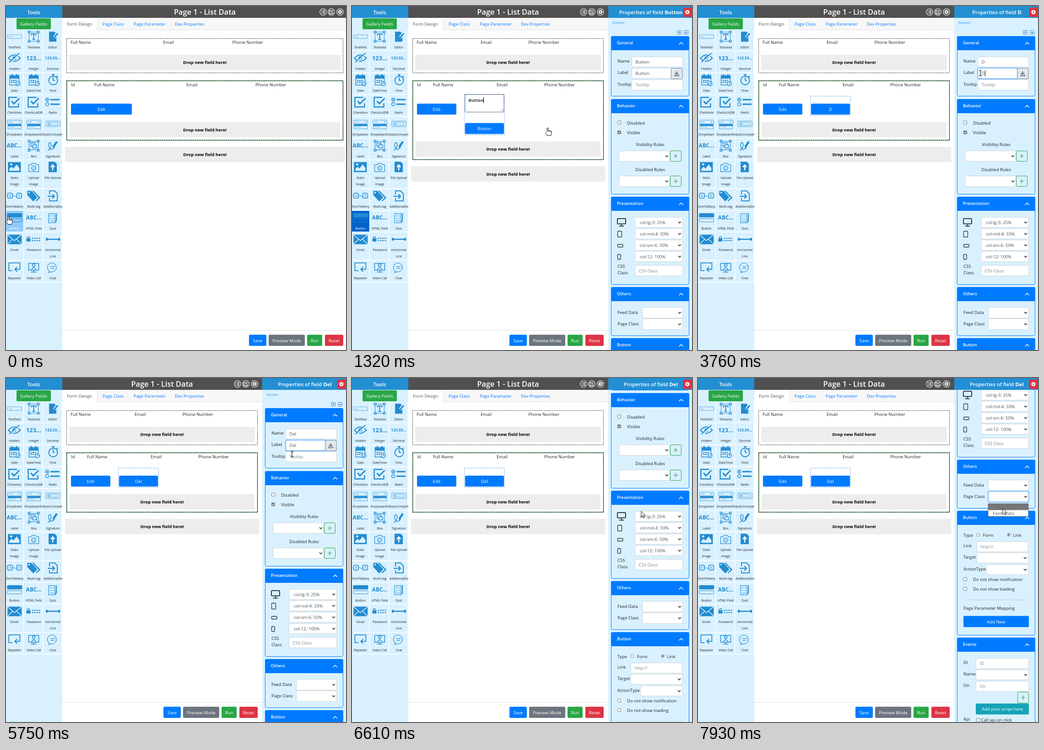
Recreate the animation shown at these times as an HTML page. Size 743 px wide and 754 px high, loop 8000 ms.

```html
<!DOCTYPE html>
<html lang="en">
<head>
<meta charset="utf-8">
<title>Form designer</title>
<style>
html, body { margin: 0; width: 100%; height: 100%; overflow: hidden; background: #fff; }
svg { display: block; }
text { font-family: "Open Sans", "Noto Sans", sans-serif; white-space: pre; }
.ico { fill: none; stroke: #238bd0; stroke-width: 1.5; }
.ico .f { fill: #238bd0; stroke: none; }
.ico .w { stroke: #fff; }
</style>
</head>
<body>
<svg id="stage" width="743" height="754" viewBox="0 0 743 754"></svg>
<script>
const LOOP = 8000, STEP = 65.5, ANCHOR = 6350;
const SKY = '#d9f1ff', HEAD = '#238fd3', BLUE = '#007bff', GREEN = '#28a745', INK = '#212529';

// markup helpers
const el = (tag, a, inner = '') =>
  `<${tag} ${Object.entries(a).map(([k, v]) => `${k}="${v}"`).join(' ')}>${inner}</${tag}>`;
const rect = (x, y, width, height, fill, o = {}) => el('rect', { x, y, width, height, fill, ...o });
const path = (d, o = {}) => el('path', { d, ...o });
const circle = (cx, cy, r, o = {}) => el('circle', { cx, cy, r, ...o });
const group = (x, y, inner, o = {}) => el('g', { transform: `translate(${x} ${y})`, ...o }, inner);
const text = (x, y, s, size = 9.5, fill = INK, o = {}) =>
  el('text', { x, y: y + size * .36, 'font-size': size, fill, ...o }, s);
const mid = { 'text-anchor': 'middle' }, semi = { 'font-weight': 600 }, bold = { 'font-weight': 700 };
const line = (d, stroke, w = 1, o = {}) => path(d, { fill: 'none', stroke, 'stroke-width': w, ...o });
const button = (x, y, w, h, fill, s) =>
  rect(x, y, w, h, fill, { rx: 2.5 }) + text(x + w / 2, y + h / 2 + .5, s, 9.5, '#fff', mid);

// tool icons, centred on 0,0
const f = { class: 'f' }, white = { class: 'w' };
const box = (x, y, w, h, o = {}) => el('rect', { x, y, width: w, height: h, ...o });
const glyphs = (s, size) => el('text', { y: size * .36, 'font-size': size, ...mid, ...bold, ...f }, s);
const corners = r => [-r, r].map(x => [-r, r].map(y => box(x - 2, y - 2, 4, 4, { fill: SKY })).join('')).join('');
const tick = path('M-6-2L-1 4L11-8', { 'stroke-width': 3 });
const checkbox = path('M6-10H-12V11H9V3', { 'stroke-width': 2.4 }) + tick;
const calendar = path('M-10-10H10V11H-10Z') + box(-10, -9, 20, 6, f) + path('M-5-13V-7M5-13V-7', { 'stroke-width': 2.5 }) +
  path('M-7 1H5M-7 5H3', { 'stroke-dasharray': '3 1.5', 'stroke-width': 2.5 });
const badge = d => circle(8, 8, 4.5, { fill: SKY }) + path(d, { 'stroke-width': 1.1 });
const dropdown = box(-15, -8, 31, 8, { rx: 1, 'stroke-width': .8 }) + path('M9-5H13L11-3Z', f) +
  path('M-12-4H-4', { 'stroke-width': .8 }) + box(-14, 1, 29, 4, f) + box(-14, 1, 29, 10, { 'stroke-width': .8 }) +
  path('M-11 7H2', { 'stroke-width': .8, 'stroke-dasharray': '3 1' });
const icons = [
  box(-15, -4, 31, 8, { rx: 1, 'stroke-width': .7 }) + el('text', { x: -12, y: 1.5, 'font-size': 4, ...f }, 'Text'),
  path('M-10-10H10V10H-10Z', { 'stroke-width': 1 }) + corners(10) + path('M-5-3V-6H5V-3M0-6V6M-3 6H3', { 'stroke-width': 2 }),
  path('M-8-11H4L8-6V11H-8Z', f) + path('M3 2L10-7', { class: 'w', 'stroke-width': 6 }) + path('M3 2L11-7', { 'stroke-width': 3.5 }),
  path('M-13 0Q0-14 13 0Q0 14-13 0Z', { 'stroke-width': 2 }) + circle(0, 0, 4, f) +
    path('M-10 10L12-10', { stroke: SKY, 'stroke-width': 4 }) + path('M-11 9L11-11', { 'stroke-width': 2 }),
  glyphs('123...', 12.8),
  glyphs('123,55...', 8.4),
  calendar + badge('M6 8L8 10L11 6'),
  calendar + badge('M8 5V8H11'),
  circle(1, 1, 9.5, { 'stroke-width': 2 }) + path('M1 1V-6M1 1H5M-2-12H4M1-12V-9M8-9L11-6', { 'stroke-width': 2 }),
  checkbox,
  checkbox,
  circle(-12, -5, 3.5) + circle(-12, -5, 1.5, f) + circle(-12, 5, 3.5) +
    path('M-5-5H15M-5 5H15', { 'stroke-width': 3 }),
  dropdown,
  dropdown,
  box(-15, -6, 31, 12, { rx: 1, 'stroke-width': .8 }) + path('M-11-3H11V3H-11Z', { 'stroke-width': .7 }) + path('M-9-2V2M-6-2V2', { 'stroke-width': 1 }),
  glyphs('ABC...', 11.7),
  path('M-10-9H10V9H-10Z', { 'stroke-width': 1.2 }) + corners(10) + box(-6, -6, 9, 8) + box(-2, -2, 8, 7, { fill: SKY }),
  path('M-11 10C-2 9-2-8-6-7C-12-5-8 8-3 8S0 4 2 6') + path('M1 3L9-9', { 'stroke-width': 4.5 }) + path('M-1 8L2 2L5 4Z', f),
  box(-14, -11, 28, 22, f) + path('M-11 8V4L-6-1L-2 3L5-6L11 2V8Z', { fill: SKY, stroke: 'none' }) + circle(-7, -6, 2.4, { fill: SKY, stroke: 'none' }),
  path('M-11-5H-6L-4-8H4L6-5H11V10H-11Z', { 'stroke-width': 1.2 }) + circle(0, 2, 5, { 'stroke-width': 1.2 }) + circle(0, 2, 2.5, { 'stroke-width': .8 }),
  path('M-9-12H4L9-7V11H-9Z', f) + path('M0 7V-4M-4 0L0-5L4 0', { class: 'w', 'stroke-width': 2.5 }),
  box(-15, -6, 11, 11, { rx: 3 }) + box(5, -6, 11, 11, { rx: 3 }) +
    path('M-4-1L5 2M-12-2H-7M-12 1H-7M8-2H13M8 1H13', { 'stroke-width': 1 }),
  path('M-14-11H-5L8 3L-1 12L-14-2Z', f) + circle(-10, -7, 1.8, { fill: SKY, stroke: 'none' }) + path('M-2-11L13 4L5 11', { 'stroke-width': 2.4 }),
  path('M-7-3V-11H4L10-5V11H-7V5', { 'stroke-width': 2 }) + path('M-11 1H3M-1-4L4 1L-1 6', { 'stroke-width': 2.2 }),
  box(-16, -10, 33, 9, { rx: 2, ...f }) + box(-15.5, 2, 32, 7, { rx: 2, 'stroke-width': 1 }),
  glyphs('ABC...', 11.7),
  box(-9, -9, 14, 20, { 'stroke-width': 1.2 }) + path('M-6-4L-5-3L-3-6M-1-4H3M-6 2L-5 3L-3 0M-1 2H3M-6 7H3', { 'stroke-width': 1 }) + path('M8-10V6L6 10', { 'stroke-width': 2 }),
  box(-15, -10, 31, 21, f) + path('M-15-10L0 3L16-10M-15 11L-4 0M16 11L5 0', { stroke: SKY }),
  box(-16, -2, 9, 7, f) + path('M-14-2V-4Q-11.5-8-9-4V-2') + path('M-4-2H16M-4 3H16', { 'stroke-width': 2.2, 'stroke-dasharray': '3 2' }),
  path('M-14 0H15', { 'stroke-width': 2.6 }) + box(-15, -3, 4, 6, f) + box(12, -3, 4, 6, f),
  path('M-4 7H-12V-10H12V4', { 'stroke-width': 1.8 }) + path('M12 4H1M6-1L1 4L6 9', { 'stroke-width': 2 }),
  box(-11, -9, 22, 15) + circle(0, -5, 3) + path('M-5 5Q0-4 5 5M-6 10H6M0 6V10', { 'stroke-width': 1.6 }),
  path('M-7 8L-9 11L-2 9.5A9.7 9.7 0 1 0-7 8Z', { 'stroke-width': 1.2 }) + path('M-5-2H5M-5 2H3', { 'stroke-width': 1.2 })
];
const names = ('Textfield Textarea Editor Hidden Integer Decimal Date DateTime Time Checkbox CheckListDB Radio ' +
  'Dropdown DropdownDB AutoComplete Label Box Signature Static_Image Upload_Image File&#160;Upload OneToMany Multi-tag AdditionalData ' +
  'Button HTML&#160;Field Quiz Email Password Horizontal_Line Repeater Video&#160;Call Chat').split(' ');
const rows = [52, 99, 147, 195, 243, 291, 338, 401, 449, 496, 558, 606];
const cols = [-2, 40.2, 81.8], BTN = 24;

function tile(i, bg = SKY, ink = INK, x = cols[i % 3], y = rows[i / 3 | 0]) {
  const r = i / 3 | 0, w = 41, h = rows[r + 1] - rows[r];
  const long = /^[A-Za-z]{10,}$/.test(names[i]);
  const label = names[i].split('_').map((s, n) =>
    text(long ? 0 : w / 2, 38.5 + n * 14.5, s, 6.9, ink, long ? {} : mid)).join('');
  return el('svg', { x, y, width: w, height: h }, rect(0, 0, w, h, bg) +
    path(`M0 ${h - .7}H${w}M${w - .5} 0V${h}`, { stroke: '#fff', 'stroke-width': 1.4 }) +
    group(20.3, 15.2, icons[i], { class: 'ico' }) + label);
}

const tools = rect(0, 0, 123, 754, SKY) + rect(0, 0, 123, 26, HEAD) + text(60.5, 14, 'Tools', 11.2, '#fff', { ...mid, ...semi }) +
  button(23, 27, 75, 24, GREEN, 'Gallery Fields') + names.map((_, i) => tile(i)).join('');

// centre column
const dropZone = (x, y, r, h = 33.5) => rect(x, y, r - x, h, '#ededed') +
  text((x + r) / 2, y + h / 2 + .3, 'Drop new field here!', 9.45, '#000', { ...mid, ...bold });
const dashed = (x, y, w, h, c, dash = '2 2', o = {}) => rect(x, y, w, h, 'none', { stroke: c, 'stroke-dasharray': dash, ...o });

function formArea({ open, dropped, editing, label }) {
  const R = open ? 550 : 737, end = open ? 560 : 743, c = (R + 132) / 2;
  const dy = editing ? 42.5 : 0, bw = open ? 86 : 133, bx = open ? 247 : 293;
  const heads = (y, xs, ns) => ns.map((s, i) => text(xs[i], y, s, 9.45)).join('');
  const tabs = [[133, 'Form Design'], [211, 'Page Class'], [279, 'Page Parameter'], [369, 'Dev Properties']];
  let s = rect(123, 0, end - 123, 754, '#fff') + rect(123, 0, end - 123, 26, '#505050') +
    text(c, 13.5, 'Page 1 - List Data', 16.4, '#fff', { ...mid, ...semi });
  const ring = { fill: 'none', stroke: '#fff', 'stroke-width': 1.1 };
  s += [-44, -26, -7].map(d => circle(R + d, 13, 7.2, ring)).join('') +
    line(`M${R - 48} 10h1.5M${R - 48} 13h1.5M${R - 48} 16h1.5M${R - 45} 10h5M${R - 45} 13h5M${R - 45} 16h5`, '#fff', 1.4) +
    line(`M${R - 26} 10h-4v7h7v-4M${R - 27} 14l5-5`, '#fff', 1.4) +
    circle(R - 7, 13, 2.6, { ...ring, 'stroke-width': 2 }) + circle(R - 7, 13, 4.2, { ...ring, 'stroke-dasharray': '1.6 1.7', 'stroke-width': 1.5 });
  s += rect(123, 26, end - 123, 26, '#f7f7f7') + rect(123, 26, 77, 27, '#fff') +
    line(`M199.5 26V52.5H${end}`, '#dee2e6') + tabs.map(([x, n], i) => text(x, 39.5, n, 9.4, i ? BLUE : '#495057')).join('');
  s += dashed(132.5, 71.5, R - 133, 75, '#000') +
    heads(79.5, open ? [141, 281, 385.5] : [141, 343, 494.5], ['Full Name', 'Email', 'Phone Number']) + dropZone(138, 107, R - 6);
  s += rect(133, 164, R - 133.5, 130 + dy, 'none', { stroke: GREEN }) + dashed(132.5, 163.8, R - 133, 130.5 + dy, '#000', '2 2', { 'stroke-width': 1.5 }) +
    heads(172.5, open ? [142, 177, 316, 420] : [142, 193, 394, 545], ['Id', 'Full Name', 'Email', 'Phone Number']) +
    button(142, 214, bw, 24, BLUE, 'Edit') + dropZone(139, 254.5 + dy, R - 7) + dropZone(129, 308.5 + dy, R + 3.5, 34);
  if (dropped) {
    s += dashed(bx - 1.5, editing ? 193.5 : 197.5, bw + 1.5, editing ? 89 : 42.5, '#4a93e8', '3 2', { 'stroke-width': .9 }) +
      button(bx, 214 + dy, bw - 1, 24, BLUE, label);
    if (editing) {
      const r = bx + bw - 1;
      s += rect(bx, 194, bw - 1, 38.5, '#fff', { rx: 2 }) + dashed(bx, 194, bw - 1, 38.5, '#000', '2 1.5', { rx: 2 }) +
        text(bx + 7.5, 206.5, label, 9.6, '#343a40', bold) + line(`M${bx + 40.5} 200V213`, '#000') +
        line(`M${r - 6} 231l5-5M${r - 3} 231l2-2`, '#666', .8);
    }
  }
  s += line(`M123 711H${end}`, '#dcdcdc') + button(R - 206, 720.5, 38, 24.5, BLUE, 'Save') +
    button(R - 163, 720.5, 79, 24.5, '#6c757d', 'Preview Mode') + button(R - 79, 720.5, 33, 24.5, GREEN, 'Run') +
    button(R - 40, 720.5, 40, 24.5, '#dc3545', 'Reset');
  return s;
}

// properties panel
const GREY = '#495057', HINT = '#7b838a';
const field = (x, y, r, b, s = '', c = GREY, pad = 8.5) =>
  rect(x + .5, y + .5, r - x - 1, b - y - 1, '#fff', { stroke: '#ced4da', rx: 2.5 }) + text(x + pad, (y + b) / 2 + .3, s, 9.5, c);
const select = (x, y, r, b, s = '') => field(x, y, r, b, '') + text(x + 11, (y + b) / 2 + .3, s, 9.6, GREY) +
  line(`M${r - 10} ${(y + b) / 2 - 1.5}l3 3l3-3`, '#333', 1.6);
const plus = (x, y, w = 24, h = 24) => rect(x + .5, y + .5, w, h, 'none', { stroke: GREEN, rx: 2.5 }) +
  line(`M${x + w / 2 - 4} ${y + h / 2 + .5}h9M${x + w / 2 + .5} ${y + h / 2 - 4}v9`, GREEN, 1.2);
const check = (x, y, on) => rect(x + .5, y + .5, 7, 7, on ? '#767676' : '#fff', { stroke: '#767676', rx: 1 }) +
  (on ? line(`M${x + 2} ${y + 4}l1.5 1.8l3-4`, '#fff', 1.2) : '');
const radio = (x, y, on) => circle(x, y, 3.5, { fill: '#fff', stroke: '#767676', 'stroke-width': .9 }) + (on ? circle(x, y, 2, { fill: '#666' }) : '');
const card = (y, b, s) => rect(566.5, y + .5, 170, b - y - 1, SKY, { stroke: BLUE, rx: 3 }) +
  rect(566, y, 171, 31, BLUE, { rx: 3 }) + text(579, y + 15, s, 9.3, '#fff', semi) + line(`M715 ${y + 18}l4.3-4.3l4.3 4.3`, '#fff', 1.5);
const label = (y, s, x = 580) => text(x, y, s);

const sizes = ['col-lg-3: 25%', 'col-md-4: 33%', 'col-sm-6: 50%', 'col-12: 100%'];
const device = (x, y, w, h, o = {}) => rect(x, y, w, h, 'none', { stroke: '#343a40', 'stroke-width': 1.4, rx: 1.5, ...o });
const panelBody = text(569, 36.5, 'Repeater', 6.4, '#3c93ea') +
  [715, 730].map((x, i) => rect(x - 4, 53.5, 8.5, 8.5, 'none', { stroke: '#2b86d9', rx: 1 }) +
    path(i ? `M${x - 2} 59h4.5l-2.2-3z` : `M${x - 2} 56.5h4.5l-2.2 3z`, { fill: '#2b5f9e' })).join('') +
  card(66, 198, 'General') + label(121, 'Name') + label(146, 'Label') + label(171.5, 'Tooltip') +
  field(611, 111, 723, 134) + field(611, 136, 699, 159) + field(611, 161, 723, 184.5, 'Tooltip', HINT) +
  rect(697.5, 136.5, 24.5, 23, '#e2e8ec', { stroke: '#6c8292', rx: 2 }) +
  line('M709.5 143v6M706 146.5l3.5 3.5l3.5-3.5M705.5 150v3h8.5v-3', '#5d666e', 1.7) +
  card(204, 413, 'Behavior') + check(580, 251.5) + label(256.5, 'Disabled', 601) + check(580, 273, true) + label(277.5, 'Visible', 601) +
  [['Visibility Rules', 304, 317], ['Disabled Rules', 358.5, 372]].map(([s, y, b]) =>
    text(651.5, y, s, 9.5, INK, mid) + select(583, b, 695, b + 24) + plus(695, b, 24, 23)).join('') +
  card(418, 611, 'Presentation') + device(580, 466, 18, 11.5, { 'stroke-width': 2 }) + line('M589 478v4M584 482.5h10', '#343a40', 1.8) +
  device(580.5, 493.5, 9, 13) + device(580.5, 522.5, 11.5, 6) + device(580.5, 544.5, 6.5, 11) +
  sizes.map((s, i) => select(618, 462.5 + i * 25, 723, 486 + i * 25, s)).join('') +
  label(570.5, 'CSS') + label(585, 'Class') + field(618, 568, 723, 592, 'CSS Class', HINT) +
  card(616, 723, 'Others') + label(671.5, 'Feed Data') + label(696.5, 'Page Class') + select(634, 660, 723, 684.5) + select(634, 685, 723, 709.5) +
  card(728, 1001, 'Button') + label(782, 'Type') + radio(612.5, 780.5) + label(782, 'Form', 622.5) + radio(679, 780.5, true) + label(782, 'Link', 688.5) +
  label(805, 'Link') + field(609, 795, 722, 818.5, 'http://', HINT) + label(830, 'Target') + select(609, 819.5, 722, 843) +
  label(855.5, 'ActionType') + select(630, 845.5, 722, 868.5) +
  check(580, 874, false) + label(879, 'Do not show notification', 601) + check(580, 895, false) + label(900, 'Do not show loading', 601) +
  line('M580 923.5H723', '#bccfdb') + label(942, 'Page Parameter Mapping') + button(580, 958.5, 143, 24.5, BLUE, 'Add New') +
  card(1006, 1290, 'Events') + label(1060.5, 'ID') + field(607, 1051, 723, 1074.5, 'ID', HINT) + label(1086, 'Name') + select(607, 1076, 723, 1099) +
  label(1111, 'On') + field(607, 1101, 723, 1124.5, 'On', HINT) + plus(698, 1125) +
  button(607, 1150.5, 116, 24, '#17a2b8', 'Add your script here') + label(1185, 'Api') + check(608, 1182.5) + label(1187, 'Call api on click', 618.5);

const panel = rect(560, 0, 183, 754, SKY) +
  el('g', { 'clip-path': 'url(#view)' }, el('g', { id: 'scroll' }, panelBody + el('g', { id: 'live' }))) +
  rect(560, 0, 183, 26, HEAD) + el('g', { id: 'title' }) + rect(723.5, 3.5, 19.5, 20.5, '#dc3545', { rx: 2 }) +
  circle(733, 13.5, 4.5, { fill: '#fff' }) + line('M731.3 11.8l3.4 3.4m0-3.4l-3.4 3.4', '#dc3545', 1.2) + el('g', { id: 'popup' });

const pointers = {
  hand: path('M-1.5 10V1.3Q0-.7 1.5 1.3V6.5Q3 5.5 4 7Q5.5 6.3 6.4 7.6Q8.4 7.2 8.4 9.5V13Q8 15 6.8 17.5H-.8L-5 11.5Q-5-9.6-5 9.6Q-3.6 8.3-1.5 10.5Z'.replace('-9.6-5', '9.2-5'),
    { fill: '#fff', stroke: '#000', 'stroke-linejoin': 'round' }) + line('M1.5 6.5V9.5M4 7V9.8M6.4 7.6V10', '#000', .8),
  arrow: path('M0 0V12.5L3 9.8L5 14.3L7 13.4L5 9H9Z', { fill: '#fff', stroke: '#000', 'stroke-width': .9 }),
  beam: line('M-3-6Q0-6 0-4.5Q0-6 3-6M0-5V5M-3 6Q0 6 0 4.5Q0 6 3 6', '#000', 1.1)
};

const stage = document.getElementById('stage');
stage.innerHTML = el('defs', {}, el('clipPath', { id: 'view' }, rect(560, 26, 183, 728, '#000'))) +
  rect(0, 0, 743, 754, '#fff') + el('g', { id: 'form' }) + tools + el('g', { id: 'picked' }) +
  el('g', { id: 'panel' }, panel) + el('g', { id: 'ghost', opacity: .65 }, tile(BTN, SKY, INK, 0, 0)) + el('g', { id: 'pointer' });
const $ = id => document.getElementById(id);
const shown = {};
function put(id, html) {
  if (shown[id] !== html) $(id).innerHTML = shown[id] = html;
}
const show = (id, on) => $(id).setAttribute('visibility', on ? 'visible' : 'hidden');

// text widths for the caret
const pen = document.createElement('canvas').getContext('2d');
function widthOf(s) {
  pen.font = '9.5px "Open Sans", "Noto Sans", sans-serif';
  return pen.measureText(s).width;
}

// motion: [time, values...]
const route = [
  [60, 5.5, 461], [250, 110, 405], [550, 340, 300], [800, 427.5, 266.5], [1710, 427.5, 266.5], [2100, 570, 195], [2440, 655, 147],
  [2540, 655, 147], [2800, 612, 147], [3080, 612, 147], [3100, 617, 147], [5470, 617, 147], [5695, 625, 167],
  [5950, 629, 230], [6150, 632, 292], [7200, 632, 292], [7580, 668, 261], [7760, 668, 261], [7920, 666, 286]
];
const wheel = [[6215, 0], [6350, 93], [6940, 328], [7075, 370], [7200, 370], [7420, 437]];
const typed = [[0, 'Button'], [3760, 'D'], [4020, 'De'], [4150, 'Del']];
const kinds = [[0, 'hand'], [2060, 'arrow'], [2360, 'beam'], [5830, 'arrow']];
const latest = (steps, t) => steps.filter(s => s[0] <= t).pop()[1];

function along(keys, t) {
  const i = keys.findIndex(k => k[0] > t);
  if (i < 1) return (i ? keys[keys.length - 1] : keys[0]).slice(1);
  const a = keys[i - 1], b = keys[i], p = (t - a[0]) / (b[0] - a[0]);
  return a.slice(1).map((v, n) => v + (b[n + 1] - v) * p);
}

function render(t) {
  const q = ANCHOR + Math.floor((t - ANCHOR) / STEP) * STEP;
  const [x, y] = along(route, q), scroll = Math.round(along(wheel, q)[0]);
  const name = latest(typed, t), open = t >= 1250;

  put('form', formArea({ open, dropped: t >= 800, editing: t >= 800 && t < 2500, label: name }));
  put('picked', t < 60 ? tile(BTN, '#90cafb', '#fff') : t < 1450 ? tile(BTN, '#0062cc', '#fff') : '');
  show('ghost', t >= 60 && t < 800);
  $('ghost').setAttribute('transform', `translate(${x - 7.5} ${y - 12})`);
  show('panel', open);
  $('scroll').setAttribute('transform', `translate(0 ${-scroll})`);
  put('title', el('text', { x: 653, y: 18, 'font-size': 11.2, fill: '#fff', ...mid, ...semi },
    'Properties of field ' + el('tspan', bold, name)));

  const focus = (a, b, w) => rect(a - .5, b - .5, w + 1, 24, 'none', { stroke: BLUE, 'stroke-opacity': .25, 'stroke-width': 3, rx: 3 }) +
    rect(a, b, w, 23, 'none', { stroke: '#80bdff', rx: 2.5 });
  const selecting = t >= 2570 && t < 3760, left = Math.max(619.5, x);
  let live = text(619.5, 123, name, 9.5, GREY);
  if (t >= 2500 && t < 7580) live += focus(611.5, 136.5, 86);
  if (selecting) live += rect(left, 141, Math.max(0, 650 - left), 13, '#0078d7');
  live += text(619.5, 148, name, 9.5, selecting && left < 621 ? '#fff' : GREY);
  const blink = t < 4150 || Math.floor((t - 4150) / 532) % 2 === 0;
  if (t >= 3760 && t < 7580 && blink)
    live += rect(Math.round(620 + widthOf(name)), 141, 1, 13, '#000');
  if (t >= 7580) live += focus(634.5, 685.5, 88);
  put('live', live);
  put('popup', t >= 7670 ? rect(634, 275.5, 88, 28, '#fff', { stroke: '#555', 'stroke-width': .8 }) +
    rect(634, 276, 88, 13.5, '#767676') + text(644, 297, 'Form Data', 9.5, GREY) : '');

  put('pointer', pointers[latest(kinds, t)]);
  $('pointer').setAttribute('transform', `translate(${x} ${y})`);
}

function tick60() {
  render(performance.now() % LOOP);
  requestAnimationFrame(tick60);
}
tick60();
</script>
</body>
</html>
```
